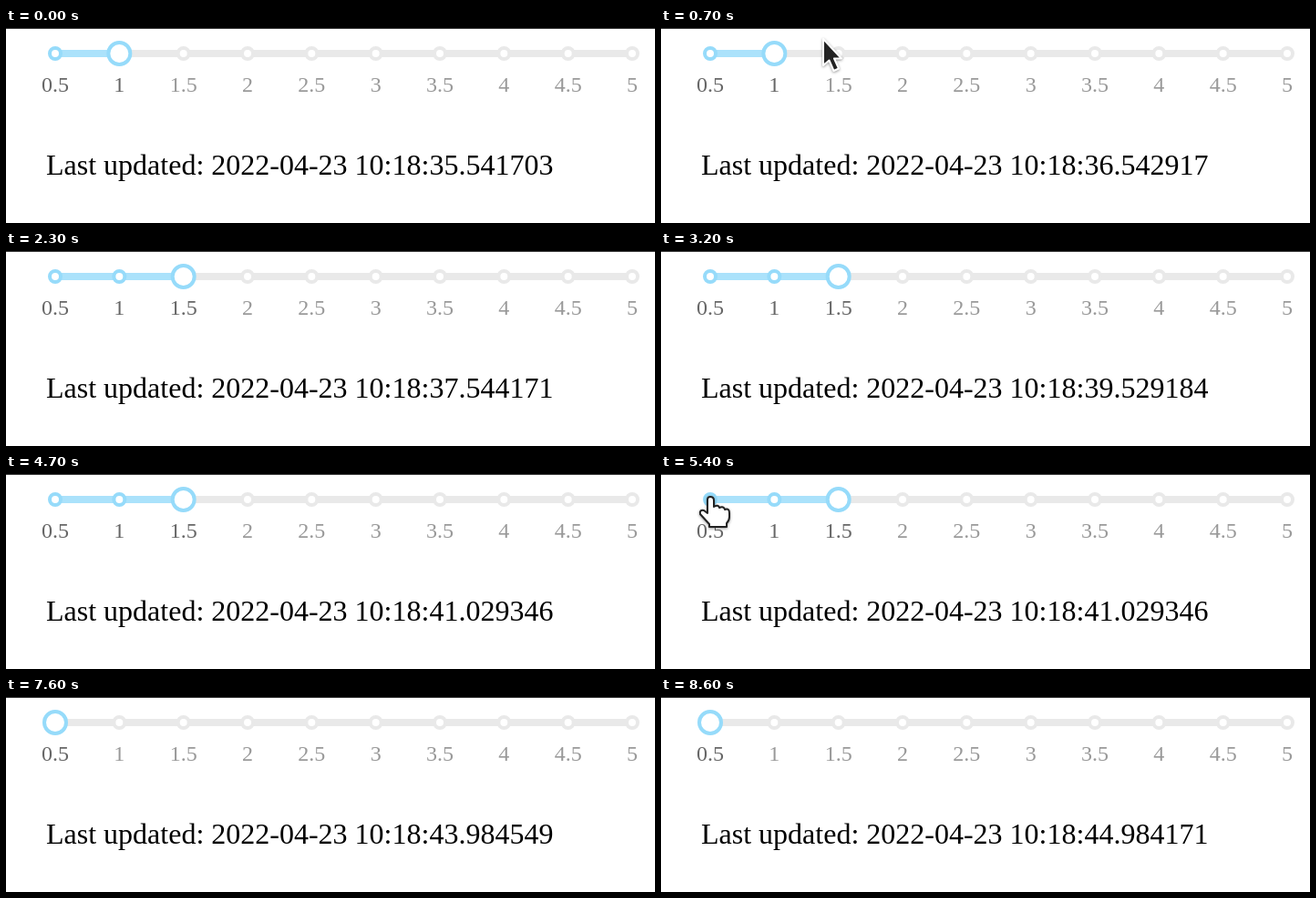
These frames come from a looping animation (712 px wide and 214 px high, 8800 ms). An HTML page:

```html
<!DOCTYPE html>
<html lang="en">
<head>
<meta charset="utf-8">
<title>Slider interval</title>
<style>
  html, body { margin: 0; width: 712px; height: 214px; overflow: hidden; background: #fff; }
  svg { display: block; }
  text { font-family: "Liberation Serif", "Times New Roman", serif; }
  .mark { font-size: 24px; text-anchor: middle; }
  .ring { fill: #fff; stroke-width: 4; }
  #hand, #arrow { filter: drop-shadow(0 1.5px 1.5px rgba(0, 0, 0, .4)); stroke-linejoin: round; }
</style>
</head>
<body>
<svg width="712" height="214" viewBox="0 0 712 214">
  <rect width="712" height="1" fill="#333"/>
  <rect x="54" y="24" width="633" height="8" rx="4" fill="#e9e9e9"/>
  <rect id="track" x="54" y="24" height="8" rx="4" fill="#abe2fb"/>
  <g id="marks"></g>
  <circle id="handle" class="ring" cy="28" r="12"/>
  <text id="stamp" x="44" y="161" font-size="32"></text>
  <path id="arrow" fill="#222" stroke="#fff" stroke-width="2"
    d="M1 1V30L7.5 24.5L12.5 36L18 33.5L13 22.5H21Z"/>
  <path id="hand" fill="#fff" stroke="#222" stroke-width="2"
    d="M-3 4Q-3 1 0 1Q4 1 4 5V12Q9 9 10 13Q15 11 16 15Q21 13 21 19V23Q21 27 18 30V34H-1V31L-11 20Q-12 15 -7 16L-3 19Z"/>
</svg>
<script>
const LOOP = 8800;
const STEP = 633 / 9;
const $ = id => document.getElementById(id);
const markX = i => 54 + i * STEP;

// Every timeline holds its value from the given time until the next entry.
const stamps = [
  [0, "35.541703"], [200, "36.542917"], [1200, "37.544171"], [3200, "39.529184"],
  [4700, "41.029346"], [6600, "42.983862"], [7100, "43.484205"], [7600, "43.984549"],
  [8100, "44.484362"], [8600, "44.984171"]
];
const positions = [[0, 1], [1500, 2], [5800, 0]];
const hovers = [[0, false], [1500, true], [2300, false], [5800, true], [6600, false]];
const pointers = [
  [0], [700, "arrow", 177, 11], [800, "arrow", 194, 33], [1000, "arrow", 209, 49],
  [1200, "hand", 202, 26], [1300, "hand", 202, 30],
  [1500, "arrow", 201, 32], [1600, "arrow", 197, 28], [2200],
  [5000, "arrow", 101, 54], [5100, "arrow", 88, 45], [5200, "arrow", 76, 37],
  [5300, "arrow", 66, 30], [5400, "hand", 54, 24], [5500, "hand", 50, 21],
  [5700, "hand", 49, 25], [5800, "arrow", 50, 33], [5900, "arrow", 51, 36],
  [6000, "arrow", 50, 33], [6100, "arrow", 49, 31], [6500]
];
const at = (timeline, t) => timeline.findLast(entry => entry[0] <= t).slice(1);

$("marks").innerHTML = Array.from({ length: 10 }, (_, i) =>
  `<circle class="ring" cx="${markX(i)}" cy="28" r="6"/>
   <text class="mark" x="${markX(i)}" y="70">${(i + 1) / 2}</text>`).join("");
const dots = document.querySelectorAll("#marks circle");
const labels = document.querySelectorAll(".mark");

function draw(now) {
  const t = now % LOOP;
  const [position] = at(positions, t);
  const [hover] = at(hovers, t);
  const [shape, x, y] = at(pointers, t);

  $("track").setAttribute("width", position * STEP);
  $("handle").setAttribute("cx", markX(position));
  $("handle").setAttribute("stroke", hover ? "#57c5f7" : "#96dbfa");
  dots.forEach((dot, i) => dot.setAttribute("stroke", i <= position ? "#96dbfa" : "#e9e9e9"));
  labels.forEach((label, i) => label.setAttribute("fill", i <= position ? "#666" : "#999"));
  $("stamp").textContent = "Last updated: 2022-04-23 10:18:" + at(stamps, t)[0];

  for (const id of ["arrow", "hand"]) {
    $(id).style.display = id === shape ? "" : "none";
    if (id === shape) $(id).setAttribute("transform", `translate(${x} ${y})`);
  }
}

function tick(now) {
  draw(now);
  requestAnimationFrame(tick);
}
draw(0);
requestAnimationFrame(tick);
</script>
</body>
</html>
```
